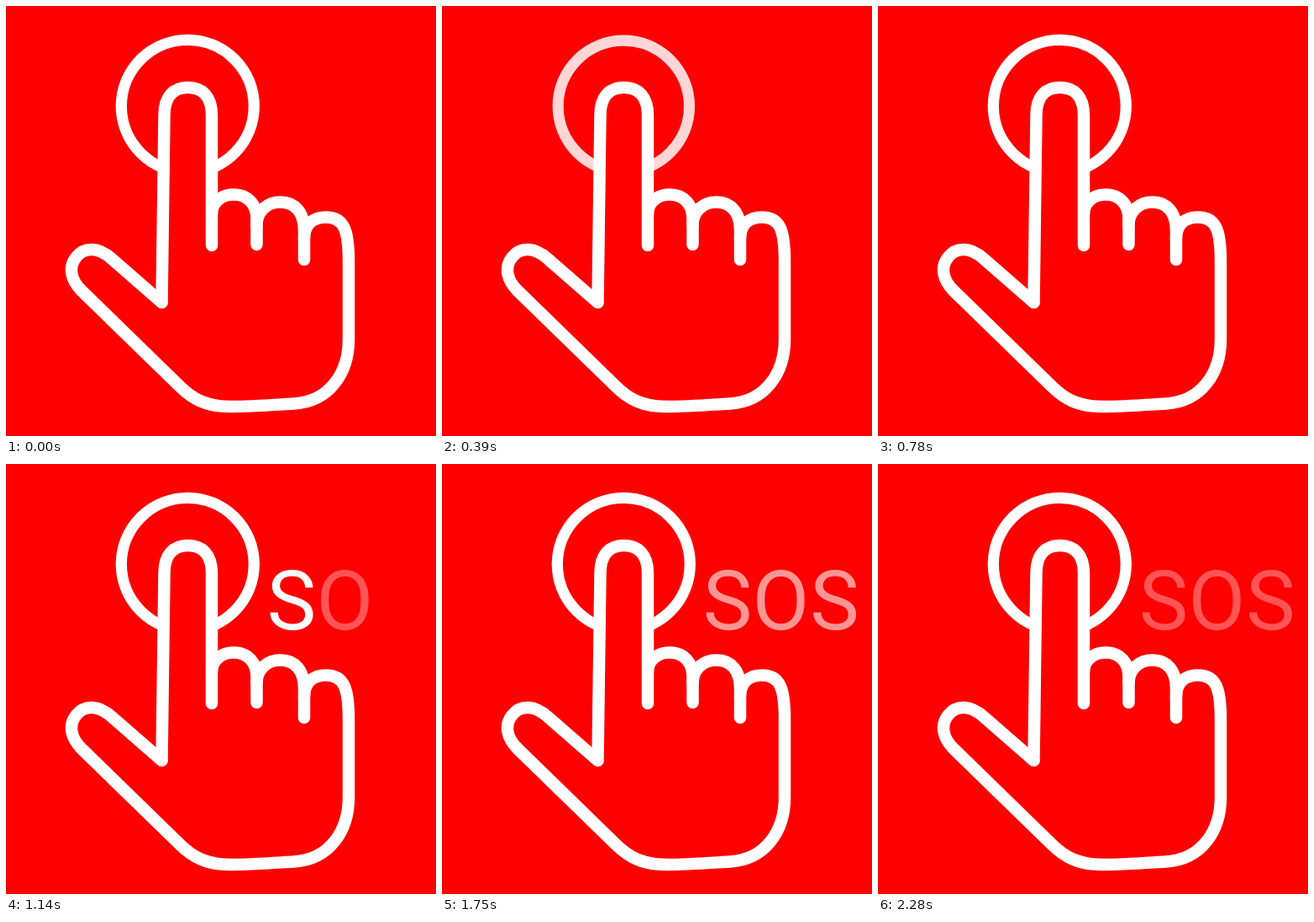
An HTML page for the animation above (2310 ms loop, 512 by 512 pixels).

```html
<!DOCTYPE html>
<html lang="en">
<head>
<meta charset="utf-8">
<title>SOS button</title>
<style>
  html, body { margin: 0; width: 100%; height: 100%; overflow: hidden; background: #f00; }
  svg { display: block; width: 100vw; height: 100vh; }
  .line { stroke: #fff; stroke-linecap: round; stroke-linejoin: round; stroke-width: 14.5; }
  text { font: 400 98.5px Roboto, Arial, sans-serif; fill: #fff; text-anchor: middle; }
  .narrow { font-stretch: 88%; }
</style>
</head>
<body>
<svg viewBox="0 0 512 512">
  <rect width="512" height="512" fill="#f00"/>
  <g id="ring">
    <circle r="79" fill="none" stroke="#fff" stroke-width="13.3"/>
  </g>
  <g class="line" fill="none">
    <path fill="#f00" d="M245 285V130C245 108 234 97 216.5 97S188.5 108 188.5 130L185.5 353"/>
    <path d="M185.500 353L127 302C110 286 93 287 83.500 299C74 311 77 326 90 339L206 452C222 468 238 477 268 477C292 477 318 475 343 473.500C385 471 408 437 408 397V304C408 268 403 251.500 381 251.500C366 251.500 355 260 355 277"/>
    <path d="M245 248C245 233 257 224.500 271 224.500C288 224.500 298.500 236 298.500 254V284"/>
    <path d="M298.500 261C298.500 244 311 233.500 327 233.500C345 233.500 355 247 355 267V302"/>
  </g>
  <g id="word">
    <text x="340" y="197">S</text>
    <text x="403.500" y="197" class="narrow">O</text>
    <text x="467.500" y="197">S</text>
  </g>
</svg>
<script>
  const LOOP = 2310, TICK = 30;
  const ring = document.getElementById('ring');
  const word = document.getElementById('word');
  const letters = [...word.children];

  // Tracks are [time in ms, value] pairs, joined by straight lines.
  const ringScale = [[60, 1], [300, 0.86], [540, 1.205], [780, 1]];
  const ringAlpha = [[60, 1], [390, 0.84], [540, 0.84], [780, 1]];
  const letterStart = [900, 1080, 1260];
  const fadeTime = 180;

  // The blink track counts steps after the word is complete.
  const blink = [[0, 1], [6, 0.5], [12, 1], [18, 0]];

  function at(track, t) {
    if (t <= track[0][0]) return track[0][1];
    for (let i = 1; i < track.length; i++) {
      const [t0, a] = track[i - 1], [t1, b] = track[i];
      if (t <= t1) return a + (b - a) * (t - t0) / (t1 - t0);
    }
    return track[track.length - 1][1];
  }

  // Steps slow from 30 ms to 80 ms in the middle of the blink.
  function blinkStep(t) {
    if (t < 1470) return 0;
    if (t < 1510) return 1;
    if (t < 2070) return 2 + Math.floor((t - 1510) / 80);
    return 9 + Math.floor((t - 2070) / TICK);
  }

  function draw(now) {
    const t = now % LOOP;
    const tick = Math.floor(t / TICK) * TICK;
    ring.setAttribute('transform', `translate(216.3 119.3) scale(${at(ringScale, tick)})`);
    ring.setAttribute('opacity', at(ringAlpha, tick));
    letters.forEach((letter, i) => {
      const start = letterStart[i];
      letter.setAttribute('opacity', at([[start, 0], [start + fadeTime, 1]], tick));
    });
    word.setAttribute('opacity', at(blink, blinkStep(t)));
  }

  function frame() {
    draw(performance.now());
    requestAnimationFrame(frame);
  }
  frame();
</script>
</body>
</html>
```
